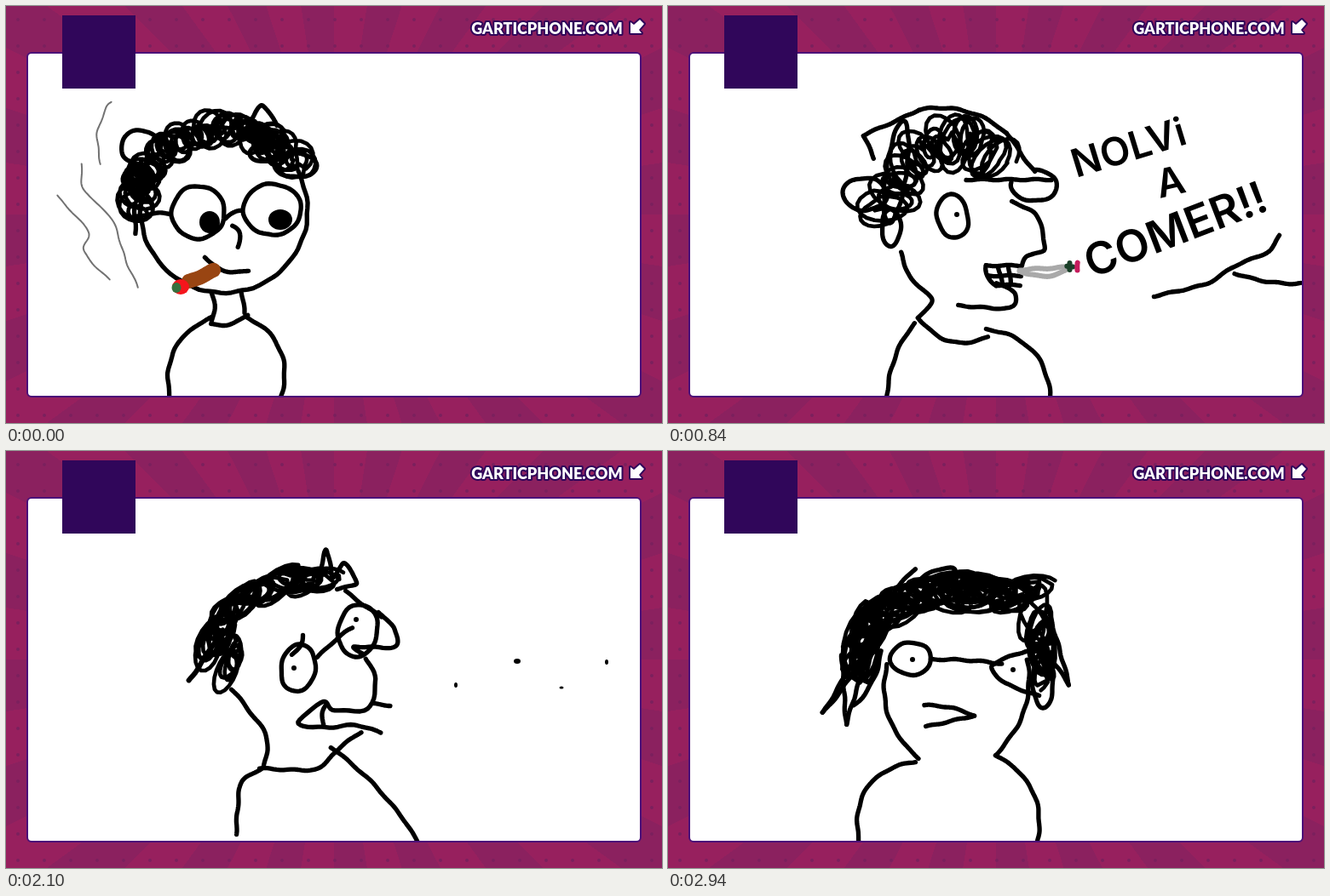
Recreate the animation shown at these times as an HTML page. Size 770x490 px, loop 3360 ms.

```html
<!DOCTYPE html>
<html lang="es">
<head>
<meta charset="utf-8">
<title>Doodle loop</title>
<style>
  html, body { margin: 0; width: 100%; height: 100%; overflow: hidden; background: #96205e; }
  svg { position: absolute; left: 0; top: 0; }
  .rays {
    position: absolute; inset: 0;
    background: repeating-conic-gradient(from 0deg at 50% 50%, #97205e 0 9deg, #8b215f 9deg 18deg);
  }
  .site { font: 900 18px Lato, "Open Sans", sans-serif; }
  .shout { font-family: Inter, sans-serif; font-weight: 600; }
  .reply { font-family: Roboto, sans-serif; font-weight: 500; }
</style>
</head>
<body>
<div class="rays"></div>
<svg width="770" height="490" viewBox="0 0 770 490">
  <defs>
    <pattern id="dots" width="31" height="31" patternUnits="userSpaceOnUse">
      <circle cx="14" cy="16" r="2" fill="#7b205d"/>
    </pattern>
    <clipPath id="paper"><rect x="26" y="56" width="718" height="402" rx="4"/></clipPath>
  </defs>
  <rect width="770" height="490" fill="url(#dots)"/>
  <rect x="25" y="55" width="720" height="404" rx="5" fill="#fff" stroke="#4b1079" stroke-width="2"/>
  <g id="drawings" clip-path="url(#paper)" fill="none" stroke-linecap="round" stroke-linejoin="round"></g>
  <rect x="66" y="11" width="86" height="86" fill="#30065a"/>
  <g fill="#fff" stroke="#30065a" stroke-width="4" stroke-linejoin="round" paint-order="stroke">
    <text class="site" x="635" y="33" text-anchor="middle">GARTICPHONE.COM</text>
    <path d="M733 19V32H746L743 28L749 21L744 16L737 22Z"/>
  </g>
</svg>
<script>
const STEP = 420, STEPS = 8, FLOOR = 458;
const BLACK = '#000', BROWN = '#994512', GREY = '#727272', YELLOW = '#ffc022', ASH = '#a9a9a9';
const RAD = Math.PI / 180;
const drawings = document.getElementById('drawings');
let layer;

function add(tag, attrs, parent = layer) {
  const node = document.createElementNS('http://www.w3.org/2000/svg', tag);
  for (const key in attrs) node.setAttribute(key, attrs[key]);
  return parent.appendChild(node);
}

// Guides: functions from t in 0..1 to a point.
function turn(cx, cy, u, v, angle) {
  const c = Math.cos(angle), s = Math.sin(angle);
  return [cx + u * c - v * s, cy + u * s + v * c];
}

function arc(cx, cy, rx, ry, from = 0, to = 360, tilt = 0) {
  return t => {
    const a = (from + (to - from) * t) * RAD;
    return turn(cx, cy, rx * Math.cos(a), ry * Math.sin(a), tilt * RAD);
  };
}
const loop = (cx, cy, rx, ry, tilt = 0) => arc(cx, cy, rx, ry, 0, 360, tilt);

// bend: height of the bow relative to its length, positive to the right of travel
function bow(x1, y1, x2, y2, bend = 0) {
  return t => {
    const h = 4 * bend * t * (1 - t);
    return [x1 + (x2 - x1) * t - (y2 - y1) * h, y1 + (y2 - y1) * t + (x2 - x1) * h];
  };
}

// Catmull-Rom curve through a few key points
function via(...n) {
  const last = n.length / 2 - 1;
  const at = (i, axis) => n[2 * Math.max(0, Math.min(last, i)) + axis];
  return t => {
    const i = Math.min(last - 1, Math.floor(t * last)), f = t * last - i;
    return [0, 1].map(axis => {
      const [a, b, c, d] = [-1, 0, 1, 2].map(k => at(i + k, axis));
      const m1 = (c - a) * 0.4, m2 = (d - b) * 0.4;
      return b + f * (m1 + f * (3 * (c - b) - 2 * m1 - m2 + f * (m1 + m2 - 2 * (c - b))));
    });
  };
}

function trace(points, color, width) {
  const list = points.map(p => p.map(v => v.toFixed(1))).join(' ');
  add('polyline', { points: list, stroke: color, 'stroke-width': width });
}

// A line with a slight tremor of the hand
function draw(guide, color = BLACK, width = 5.3, samples = 60) {
  const points = [];
  for (let i = 0; i <= samples; i++) {
    const [x, y] = guide(i / samples);
    points.push([x + 0.7 * Math.sin(y / 5), y + 0.7 * Math.sin(x / 5)]);
  }
  trace(points, color, width);
}
const drawAll = (...guides) => guides.forEach(guide => draw(guide));

// Uneven loops along a guide: "along" and "across" are the radii of one loop
function coil(guide, loops, along, across, color = BLACK, width = 4.6) {
  let seed = loops * 97 + along;
  const random = () => (seed = (seed * 16807) % 2147483647) / 2147483647;
  const points = [], perLoop = 18;
  random();
  let size, lean, shift;
  for (let i = 0; i < loops * perLoop; i++) {
    if (i % perLoop === 0) {
      size = 0.55 + 0.6 * random();
      lean = random() - 0.5;
      shift = (random() - 0.5) * across * 0.7;
    }
    const t = i / (loops * perLoop), a = i / perLoop * 2 * Math.PI;
    const [x, y] = guide(t), [x2, y2] = guide(t + 0.001);
    const u = size * along * Math.cos(a), v = size * across * Math.sin(a) + shift;
    points.push(turn(x, y, u, v, Math.atan2(y2 - y, x2 - x) + lean));
  }
  trace(points, color, width);
}

const blob = (cx, cy, rx, ry = rx, fill = BLACK) => add('ellipse', { cx, cy, rx, ry, fill });

function shoulders(left, neckLeft, neckRight, right, top, bulge = 0.2) {
  draw(bow(left, FLOOR, neckLeft, top, -bulge));
  draw(bow(neckRight, top, right, FLOOR, -bulge));
}

function write(text, x, y, size, angle, style) {
  const attrs = { transform: `translate(${x} ${y}) rotate(${angle})`, 'font-size': size, class: style, fill: BLACK };
  add('text', attrs).textContent = text;
}

// Each layer is visible during the listed steps only.
function scene(visible, paint) {
  layer = add('g', { opacity: 0 }, drawings);
  paint();
  const keys = Array.from({ length: STEPS + 1 }, (_, i) => (
    { opacity: visible.includes(i % STEPS) ? 1 : 0, offset: i / STEPS, easing: 'steps(1, end)' }
  ));
  layer.animate(keys, { duration: STEP * STEPS, iterations: Infinity });
}

// Man with round glasses
scene([0], () => {
  draw(arc(256, 240, 98, 97, -28, 197));
  drawAll(loop(225.5, 242.5, 31, 31), loop(312.5, 239, 34, 30));
  blob(239, 254, 12, 13);
  blob(322, 251, 14, 12);
  drawAll(bow(193, 244, 149, 249, 0.05), bow(151, 235, 152, 268), bow(258, 249, 277, 241, -0.1));
  drawAll(bow(265, 258, 272, 284, -0.25), bow(233, 295, 285, 311, 0.15));
  draw(bow(214, 324, 244, 311), BROWN, 17);
  blob(205, 330, 10, 9, '#f5151c');
  blob(200, 331, 5.5, 6, '#36713f');
  drawAll(bow(242, 338, 242, 371, -0.08), bow(277, 338, 280, 361), bow(241, 374, 284, 363, 0.12));
  shoulders(192, 242, 284, 323, 366);
  draw(via(124, 113, 118, 120, 107, 150, 111, 186), GREY, 2);
  draw(via(89, 186, 91, 215, 125, 252, 141, 300, 155, 331), GREY, 2);
  draw(via(60, 223, 97, 266, 91, 288, 121, 322), GREY, 2);
  coil(arc(256, 245, 106, 99, 180, 325), 46, 16, 20);
  coil(bow(143, 203, 160, 203), 6, 12, 14);
  coil(bow(290, 148, 322, 160), 7, 14, 13);
  drawAll(loop(158, 166, 23, 20), loop(340, 187, 25, 14), loop(306, 172, 20, 11));
  draw(via(288, 132, 301, 117, 318, 140));
});

// Same man, ears and thick cigar
scene([1], () => {
  draw(arc(261, 245, 105, 102, -35, 185));
  drawAll(arc(162, 272, 12, 15, 70, 270), arc(361, 269, 12, 20, -90, 115));
  drawAll(loop(226, 240, 39, 32), loop(316, 238, 34, 31), bow(155, 256, 365, 239, -0.05));
  blob(239, 256, 13);
  blob(322, 250, 14, 12);
  drawAll(via(273, 258, 281, 275, 268, 291), bow(236, 295, 293, 311, 0.1));
  draw(bow(205, 329, 246, 313), BROWN, 22);
  draw(bow(186, 329, 204, 340, 0.1), '#ee1b22', 6);
  draw(bow(191, 325, 200, 336), '#316849', 6);
  drawAll(bow(243, 347, 239, 374), bow(279, 347, 284, 370), bow(236, 371, 288, 369, 0.23));
  shoulders(175, 236, 288, 350, 369, 0.23);
  [bow(119, 268, 158, 328, -0.06), bow(102, 287, 153, 322, -0.08), bow(104, 290, 150, 335, 0.14), bow(157, 305, 155, 330)]
    .forEach(wisp => draw(wisp, GREY));
  coil(arc(252, 232, 97, 88, 180, 330), 38, 13, 24);
  drawAll(arc(154, 207, 16, 17, 60, 290), loop(170, 222, 13, 15), via(245, 140, 260, 110, 272, 140));
});

// The call
scene([1, 2], () => {
  write('NOLVi', 479, 202, 46, -17, 'shout');
  write('A', 577, 226, 46, -13, 'shout');
  write('COMER!!', 497, 320, 52, -21, 'shout');
  drawAll(via(571, 341, 630, 327, 665, 306, 705, 288, 718, 270), bow(665, 314, 742, 326, 0.05));
});

// Man in profile with a cap
scene([2, 3, 4], () => {
  coil(arc(338, 258, 84, 100, 185, 310), 24, 16, 29);
  drawAll(loop(231, 221, 26, 19), loop(262, 260, 11, 22), loop(268, 195, 12, 60, 8));
  drawAll(bow(230, 152, 295, 122), bow(230, 152, 242, 180), bow(295, 122, 398, 150, -0.12), bow(398, 150, 430, 195));
  drawAll(bow(350, 204, 450, 204), arc(430, 211, 27, 18, -90, 190));
  draw(loop(334, 247, 18, 26, -12));
  blob(339, 245, 3);
  draw(via(403, 230, 432, 245, 442, 285, 420, 294, 416, 305));
  drawAll(bow(415, 305, 374, 305), bow(374, 305, 385, 328, 0.2), bow(385, 328, 413, 328));
  drawAll(bow(376, 317, 414, 317), bow(388, 306, 392, 326), bow(400, 306, 402, 328));
  drawAll(via(385, 325, 408, 338, 400, 355, 340, 352), via(273, 290, 285, 320, 310, 345, 294, 366));
  drawAll(bow(294, 366, 375, 389, 0.2), bow(290, 372, 257, FLOOR, 0.08), bow(373, 380, 449, FLOOR, -0.2));
  draw(bow(413, 311, 467, 311, 0.12), ASH, 6);
  draw(bow(413, 310, 468, 307), ASH, 6);
  draw(bow(469, 306, 476, 306), '#1b4029', 6);
  draw(bow(472, 302, 472, 310), '#1b4029', 6);
  draw(bow(481, 301, 481, 310), '#c41c5c', 6);
});

// The reply
scene([3], () => {
  drawAll(bow(577, 78, 660, 74), arc(660, 146, 62, 72, -90, 80), bow(672, 217, 563, 218));
  write('OK!', 574, 185, 68, -2, 'reply');
  draw(via(494, 278, 503, 296, 590, 281, 640, 281, 700, 254, 660, 242, 638, 254, 545, 247, 494, 278));
});

// Mouth open
scene([5], () => {
  coil(arc(385, 243, 145, 95, 185, 266), 28, 27, 13);
  coil(bow(258, 262, 268, 232), 5, 24, 10);
  draw(bow(215, 270, 255, 210), BLACK, 6);
  draw(via(365, 158, 376, 116, 384, 148, 396, 132, 412, 155, 388, 162));
  drawAll(bow(398, 165, 440, 195), via(265, 280, 305, 333, 303, 372), via(298, 373, 365, 374, 385, 354, 417, 330));
  draw(via(423, 244, 434, 270, 425, 303, 385, 304, 372, 295, 342, 320, 375, 325, 410, 322, 440, 331));
  drawAll(bow(376, 298, 372, 322, 0.1), bow(430, 297, 451, 299));
  drawAll(loop(343, 255, 20, 28, 10), loop(413, 211, 23, 31, 10));
  blob(338, 255, 3);
  blob(411, 198, 3);
  drawAll(bow(366, 243, 407, 208, -0.05), bow(349, 216, 336, 240, -0.1));
  drawAll(via(437, 190, 456, 208, 456, 230, 408, 230, 420, 238));
  drawAll(via(270, 451, 276, 390, 300, 374), bow(381, 348, 483, FLOOR, -0.05));
  blob(600, 247, 4, 3);
  blob(528, 275, 2, 3);
  blob(705, 248, 2, 3);
  blob(652, 278, 2.5, 1.5);
});

// Caught by the woman
scene([6], () => {
  coil(bow(325, 170, 385, 153), 7, 45, 16);
  draw(loop(345, 167, 53, 28, -4));
  draw(bow(162, 188, 415, 150, -0.03), BLACK, 6);
  draw(bow(180, 184, 425, 150, -0.1));
  drawAll(loop(208, 220, 13, 42, 25), loop(248, 224, 14, 92, 17), loop(245, 220, 19, 62, 18));
  coil(bow(256, 240, 260, 205), 7, 48, 10);
  drawAll(loop(264, 256, 7, 23), bow(275, 215, 312, 165, 0.25), loop(421, 175, 18, 9));
  drawAll(bow(430, 168, 494, 227, -0.2), loop(468, 193, 8, 20, -42));
  draw(via(345, 222, 333, 258, 340, 283, 358, 278, 373, 245, 364, 242, 345, 222));
  draw(loop(412, 209, 23, 28, 10));
  blob(348, 258, 3);
  blob(412, 209, 3);
  draw(bow(373, 240, 386, 222));
  draw(via(423, 237, 430, 275, 423, 303, 385, 298, 352, 299, 347, 323, 412, 325, 416, 345, 380, 346));
  drawAll(bow(378, 300, 374, 322), bow(388, 350, 302, 371, 0.17), via(268, 275, 305, 323, 302, 371));
  drawAll(via(278, FLOOR, 283, 388, 302, 373), bow(385, 358, 497, FLOOR, -0.08));
  draw(bow(445, 375, 605, 368, -0.05));
  coil(bow(440, 382, 455, 382), 7, 9, 8);

  draw(loop(655, 311, 40, 53, -25));
  drawAll(via(645, 272, 655, 288, 659, 305), bow(633, 321, 653, 335, -0.15), bow(662, 322, 690, 318, -0.2));
  blob(645, 301, 3);
  blob(670, 325, 3);
  drawAll(bow(645, 350, 605, 369), bow(605, 369, 602, FLOOR, 0.13), bow(635, 367, 645, 355));
  drawAll(bow(685, 364, 712, 420, -0.2), arc(713, 331, 19, 30, -90, 120));

  draw(bow(655, 235, 692, 290), YELLOW, 20);
  [loop(515, 284, 13, 19), loop(533, 279, 7, 9), loop(551, 262, 12, 22), via(618, 230, 623, 185, 634, 228)]
    .forEach(curl => draw(curl, YELLOW, 6));
  coil(bow(575, 243, 618, 218), 9, 14, 23, YELLOW, 6);
  coil(bow(635, 215, 692, 275), 9, 27, 15, YELLOW, 6);
  coil(bow(708, 315, 740, 388), 8, 19, 9, YELLOW, 6);
  coil(bow(735, 402, 690, 442), 8, 11, 13, YELLOW, 5);
  coil(bow(682, 442, 720, 442), 5, 13, 13, YELLOW, 5);
});

// Tired man, long hair
scene([7], () => {
  coil(arc(335, 242, 112, 78, 185, 285), 34, 34, 16);
  coil(bow(350, 167, 428, 165), 13, 34, 16);
  coil(bow(432, 190, 440, 260), 11, 34, 13);
  coil(bow(240, 210, 220, 250), 6, 38, 15);
  drawAll(bow(245, 200, 182, 308), bow(182, 308, 235, 240), bow(235, 235, 209, 322), bow(209, 322, 204, 240));
  drawAll(bow(250, 235, 218, 299, -0.1), bow(205, 230, 290, 138), loop(313, 153, 27, 11, -28));
  drawAll(bow(446, 185, 471, 275), bow(471, 275, 440, 230), loop(440, 270, 12, 32));
  drawAll(bow(257, 250, 294, 361, 0.15), bow(422, 245, 384, 357, -0.13));
  drawAll(bow(224, FLOOR, 291, 365, -0.25), bow(384, 357, 434, FLOOR, -0.18));
  draw(loop(285, 244, 24, 19));
  blob(287, 245, 3);
  draw(via(420, 235, 380, 252, 395, 272, 435, 288));
  blob(405, 257, 3);
  drawAll(bow(309, 245, 392, 250, -0.02), bow(301, 299, 360, 311, -0.06), bow(360, 311, 302, 324));
});
</script>
</body>
</html>
```
